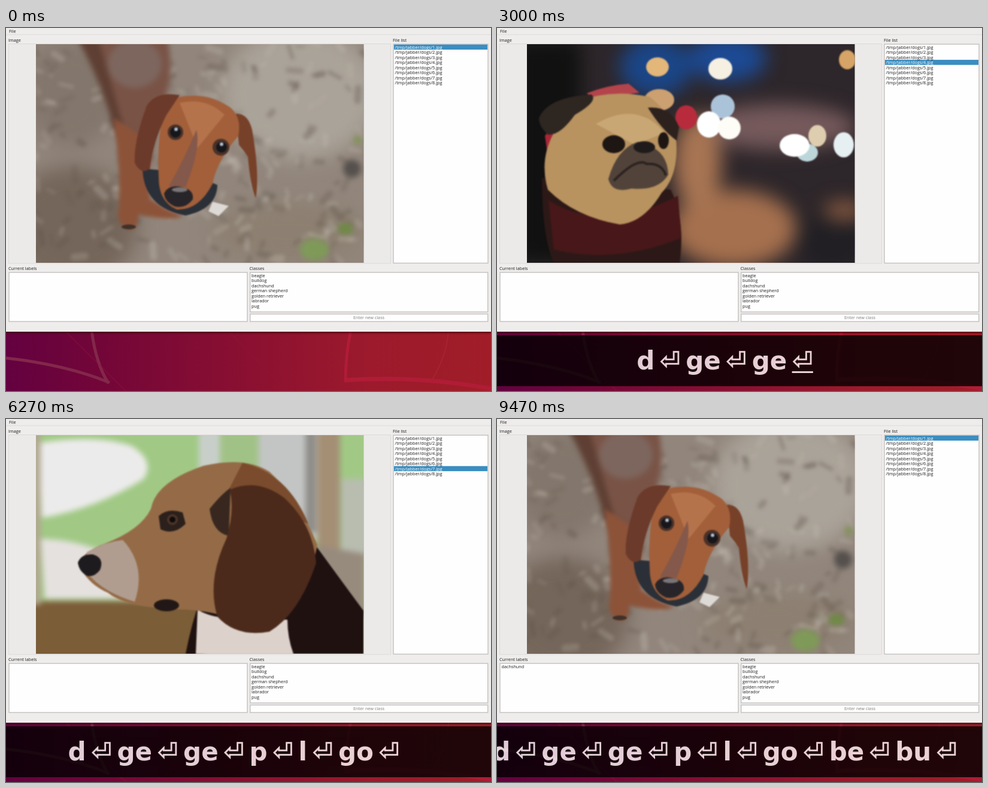
Animation, 810 px wide and 606 px high, one loop 9.54 s. Source, as an HTML page:

```html
<!DOCTYPE html>
<html lang="en">
<head>
<meta charset="utf-8">
<title>Image labelling</title>
<style>
html, body { margin: 0; width: 100%; height: 100%; overflow: hidden; background: #efedec; }
svg { position: absolute; left: 0; top: 0; }
#ui text { font: 7.27px "Open Sans", "Noto Sans", sans-serif; fill: #1e1e1e; white-space: pre; }
#ui .hint { fill: #7d7d7d; text-anchor: middle; }
#ui .on { fill: #fff; }
.box { fill: #fefefe; stroke: #c3c1bf; stroke-width: 1.4; }
.s { filter: blur(1.2px); }
.k { filter: blur(3px); }
.m { filter: blur(5px); }
.l { filter: blur(16px); }
#pics > g { display: none; }
#overlay { position: absolute; left: 0; top: 513px; width: 810px; height: 85px; background: #000; opacity: .8; overflow: hidden; }
#keys { display: flex; justify-content: center; width: 761px; color: #fff; white-space: pre;
  font: bold 42px/85px "DejaVu Sans", sans-serif; }
#keys p { margin: 0; flex: none; }
#keys .held { text-decoration: underline 3px; text-underline-offset: 3px; text-decoration-skip-ink: none; }
</style>
</head>
<body>
<svg width="810" height="606" viewBox="0 0 810 606">
  <defs>
    <linearGradient id="wall">
      <stop offset="0" stop-color="#640140"/><stop offset=".2" stop-color="#730638"/>
      <stop offset=".5" stop-color="#8b1031"/><stop offset=".75" stop-color="#9c1a2c"/><stop offset="1" stop-color="#a01d28"/>
    </linearGradient>
    <linearGradient id="shade" x2="0" y2="1">
      <stop offset="0" stop-color="#200" stop-opacity=".55"/><stop offset="1" stop-color="#200" stop-opacity="0"/>
    </linearGradient>
    <clipPath id="desk"><path d="M0 507H810V606H0Z"/></clipPath>
    <clipPath id="wide"><path d="M50 27H597.5V392H50Z"/></clipPath>
    <clipPath id="full"><path d="M5 31H641.5V388H5Z"/></clipPath>
  </defs>

  <g clip-path="url(#desk)" fill="none">
    <rect y="507" width="810" height="99" fill="url(#wall)"/>
    <path d="M0 551Q100 562 173 592" stroke="#82284a" stroke-width="5"/>
    <path d="M143 505Q150 560 171 593" stroke="#82284a" stroke-width="5"/>
    <path d="M576 505Q567 545 567 590" stroke="#b01c36" stroke-width="5"/>
    <path d="M565 588Q690 580 810 602" stroke="#b01c36" stroke-width="7"/>
    <path d="M739 507Q735 550 712 586" stroke="#a82232" stroke-width="2"/>
    <path d="M372 507L470 606M100 507L200 606" stroke="#92143a" stroke-opacity=".35" stroke-width="2"/>
    <rect y="507" width="810" height="5" fill="url(#shade)"/>
  </g>

  <g id="ui">
    <path d="M0 11H810" stroke="#dddbd9"/>
    <rect x="4.5" y="26.5" width="638" height="366.5" fill="#ebeae9" stroke="#dcdad8"/>
    <rect class="box" x="647" y="27" width="158" height="365.5"/>
    <rect class="box" x="5" y="408" width="398" height="82"/>
    <rect class="box" x="407.7" y="408" width="397" height="66"/>
    <rect class="box" x="407.7" y="477.5" width="397" height="12.5"/>
    <text x="5" y="8">File</text>
    <text x="4" y="22.8">Image</text>
    <text x="646" y="22.8">File list</text>
    <text x="4" y="404">Current labels</text>
    <text x="406.5" y="404">Classes</text>
    <text x="606" y="486" class="hint">Enter new class</text>
    <text x="7.5" y="415.5" id="label"></text>
    <rect id="row" x="648" width="156" height="8.5" fill="#3a8dc0"/>
  </g>

  <g id="pics">
    <g clip-path="url(#wide)">
      <rect x="50" y="27" width="548" height="365" fill="#92867c"/>
      <g class="l">
        <ellipse cx="110" cy="330" rx="110" ry="100" fill="#75665b"/>
        <ellipse cx="110" cy="110" rx="80" ry="90" fill="#83766c"/>
        <ellipse cx="490" cy="110" rx="130" ry="110" fill="#aaa399"/>
        <ellipse cx="470" cy="340" rx="130" ry="50" fill="#8d8072"/>
      </g>
      <g id="litter" class="k" fill="none" stroke-linecap="round"></g>
      <g class="m">
        <path d="M125 20H270Q285 90 255 140L240 230L185 180Q165 100 125 20Z" fill="#795346"/>
        <ellipse cx="215" cy="60" rx="45" ry="40" fill="#7d665e"/>
        <path d="M120 20H155L195 160L180 170Q160 90 120 20Z" fill="#5f3f33"/>
        <ellipse cx="578" cy="235" rx="15" ry="15" fill="#55504d"/>
        <ellipse cx="515" cy="370" rx="24" ry="18" fill="#7f9a58"/>
        <ellipse cx="567" cy="335" rx="13" ry="9" fill="#6d8a42"/>
        <ellipse cx="587" cy="187" rx="6" ry="7" fill="#7d9350"/>
      </g>
      <path class="k" d="M180 150L240 190L240 285Q270 305 296 314Q270 324 222 311Q220 336 206 337Q188 330 187 312Q194 260 180 150Z" fill="#8c5339"/>
      <g class="s">
        <ellipse cx="205" cy="332" rx="12" ry="4" fill="#40302a"/>
        <path d="M228 235Q230 300 300 313Q352 302 353 262L300 240Z" fill="#2b2f37"/>
        <path d="M345 290L372 297L355 314L338 306Z" fill="#ddd9d6"/>
        <path d="M384 143Q404 142 411 170Q424 245 417 284Q408 262 404 215Q398 205 389 195Z" fill="#774028"/>
        <path d="M285 116Q335 105 375 133Q394 150 388 180Q352 222 345 260Q322 305 285 303Q255 290 255 250Q252 190 262 145Z" fill="#a25f3a"/>
        <path d="M290 125Q335 115 365 145L320 200Z" fill="#b5734b"/>
        <path d="M318 170Q326 200 300 265L272 264Q300 215 318 170Z" fill="#84584a"/>
        <path d="M290 112Q250 105 235 130Q213 190 215 225Q225 246 240 235Q245 190 268 145Z" fill="#6b3a2a"/>
        <circle cx="283" cy="174" r="13" fill="#4a3128"/><circle cx="359" cy="199" r="14" fill="#4a3128"/>
        <circle cx="283" cy="174" r="9" fill="#16161b"/><circle cx="360" cy="199" r="9" fill="#16161b"/>
        <circle cx="284" cy="169" r="3" fill="#b3c0d2"/><circle cx="360" cy="194" r="3" fill="#b3c0d2"/>
        <path d="M264 276Q272 260 295 266Q314 270 312 286Q300 302 282 298Q265 290 264 276Z" fill="#272529"/>
        <ellipse cx="290" cy="270" rx="13" ry="4" fill="#797477"/>
      </g>
    </g>

    <g clip-path="url(#wide)">
      <rect x="50" y="27" width="548" height="365" fill="#f2ebe9"/>
      <g class="l">
        <ellipse cx="575" cy="120" rx="35" ry="100" fill="#cfbdb2"/>
        <ellipse cx="440" cy="165" rx="170" ry="28" fill="#dac6b8"/>
        <rect x="30" y="20" width="100" height="130" fill="#56642f"/>
      </g>
      <g class="m">
        <path d="M50 27H275Q262 70 300 135Q260 155 222 155L210 185H190L170 155Q100 160 50 130Z" fill="#667340"/>
        <path d="M50 30H100L110 80L50 125ZM80 150Q110 115 170 120L240 75L298 135Q260 150 222 155L210 185H190L180 160Z" fill="#34471f"/>
        <path d="M50 165Q110 190 200 185Q270 195 320 235L420 200Q520 195 598 175V238Q480 262 420 255L300 245L50 230Z" fill="#a0744f"/>
      </g>
      <g class="k">
        <path d="M50 320L155 215Q180 215 265 270L345 285L350 310L50 366Z" fill="#efeae8"/>
        <path d="M220 170Q265 175 300 215L280 225Q255 200 220 185Z" fill="#efe8e5"/>
        <path d="M50 210Q95 205 140 240Q160 275 182 288L125 296Q110 325 50 335Z" fill="#8d5c36"/>
        <path d="M192 232Q225 215 255 245L258 277Q215 280 192 232Z" fill="#99683f"/>
        <path d="M50 358Q140 350 200 328Q290 305 345 300Q420 262 598 246V392H50Z" fill="#8b8a86"/>
        <ellipse cx="300" cy="362" rx="48" ry="26" fill="#b4a99f"/><ellipse cx="560" cy="350" rx="60" ry="40" fill="#b0a59a"/>
        <ellipse cx="535" cy="280" rx="65" ry="10" fill="#c0b5aa"/>
      </g>
      <g class="s">
        <path d="M332 275Q352 315 343 340L357 392H505Q503 340 470 300Q450 255 405 220L365 230Z" fill="#8f653f"/>
        <path d="M405 222Q455 255 475 305Q506 350 505 392H498Q480 330 450 300Z" fill="#5d432c"/>
        <path d="M266 258Q275 244 300 228Q305 190 345 177L375 185Q402 200 400 230Q395 260 350 275Q310 282 275 274Z" fill="#85603e"/>
        <path d="M266 258Q275 244 303 226Q340 232 348 258Q325 282 280 276Z" fill="#302a28"/>
        <path d="M303 215Q315 185 345 178L372 187Q330 205 303 215Z" fill="#493426"/>
        <path d="M319 184Q311 140 321 132Q340 150 345 177Z" fill="#30241f"/>
        <path d="M351 180Q350 125 367 118Q388 145 398 185L397 222Q365 200 351 180Z" fill="#2f2420"/>
        <path d="M360 178Q358 145 368 135Q380 160 388 190Z" fill="#604437"/>
        <ellipse cx="332" cy="214" rx="5" ry="4" fill="#15100e"/>
        <path d="M358 319Q395 306 416 276" fill="none" stroke="#4b2d25" stroke-width="11"/>
        <circle cx="366" cy="339" r="6" fill="none" stroke="#c9a477" stroke-width="2"/>
        <path d="M361 346H371V362L366 369L361 362Z" fill="#bd4038"/>
      </g>
    </g>

    <g clip-path="url(#wide)">
      <rect x="50" y="27" width="548" height="365" fill="#8e9379"/>
      <g class="l"><rect x="30" y="270" width="600" height="150" fill="#777557"/><ellipse cx="470" cy="90" rx="140" ry="60" fill="#b9bbaa"/></g>
      <g class="s">
        <path d="M235 392Q240 280 285 235H365Q415 290 420 392Z" fill="#8d6440"/>
        <path d="M270 205L268 95Q305 110 320 140Q340 110 375 95L374 205Q355 275 322 285Q287 270 270 205Z" fill="#a27448"/>
        <path d="M290 205Q322 180 354 205Q350 280 322 285Q296 280 290 205Z" fill="#2c2522"/>
        <circle cx="298" cy="188" r="6" fill="#1b1513"/><circle cx="347" cy="188" r="6" fill="#1b1513"/>
      </g>
    </g>

    <g clip-path="url(#wide)">
      <rect x="50" y="27" width="548" height="365" fill="#2d262a"/>
      <g class="l">
        <ellipse cx="265" cy="65" rx="60" ry="50" fill="#1a4688"/>
        <ellipse cx="385" cy="50" rx="65" ry="40" fill="#1c4a94"/>
        <ellipse cx="470" cy="165" rx="130" ry="38" fill="#765a5c"/>
        <ellipse cx="395" cy="335" rx="105" ry="65" fill="#a5704e"/>
        <ellipse cx="335" cy="225" rx="40" ry="80" fill="#a87553"/>
        <ellipse cx="560" cy="355" rx="60" ry="50" fill="#211f24"/>
        <ellipse cx="580" cy="305" rx="35" ry="15" fill="#916044"/>
        <rect x="30" y="20" width="110" height="372" fill="#101110"/>
      </g>
      <g class="s">
        <ellipse cx="268" cy="65" rx="19" ry="16" fill="#e3b679"/><ellipse cx="271" cy="120" rx="25" ry="18" fill="#cca071"/>
        <ellipse cx="373" cy="68" rx="20" ry="18" fill="#f6f0e2"/><circle cx="377" cy="131" r="20" fill="#abc3d8"/>
        <ellipse cx="354" cy="161" rx="20" ry="22" fill="#fff"/><circle cx="388" cy="167" r="19" fill="#fdfcf7"/>
        <ellipse cx="316" cy="149" rx="18" ry="20" fill="#b82b3d"/><ellipse cx="518" cy="208" rx="18" ry="15" fill="#bcd6da"/>
        <ellipse cx="497" cy="196" rx="25" ry="19" fill="#fff"/><ellipse cx="535" cy="180" rx="15" ry="18" fill="#dfcdb0"/>
        <ellipse cx="579" cy="195" rx="17" ry="21" fill="#e6f0f3"/><ellipse cx="585" cy="53" rx="14" ry="16" fill="#d6a466"/>
        <path d="M75 250Q75 350 95 392H305Q315 320 290 270Z" fill="#2c1917"/>
        <path d="M86 288Q180 345 302 280L308 350Q200 395 95 370Z" fill="#481719"/>
        <path d="M80 180Q90 165 105 172V215H85Z" fill="#a92738"/>
        <path d="M150 109Q185 95 220 93L238 108L160 118Z" fill="#b4444b"/>
        <path d="M125 125Q190 100 255 115Q300 150 300 200Q300 250 275 275Q245 325 205 328Q130 315 85 270Q70 220 95 175Z" fill="#b8925f"/>
        <path d="M165 160Q235 120 280 175L230 195Z" fill="#c9a775"/>
        <path d="M70 150Q85 115 158 111Q170 122 130 145Q105 180 85 178Q70 165 70 150Z" fill="#2e2621"/>
        <path d="M252 133Q290 130 304 165L300 188Q275 170 252 133Z" fill="#2d211e"/>
        <path d="M186 252Q200 202 235 190Q285 200 286 245Q270 272 225 268Q192 277 186 252Z" fill="#51433a"/>
        <ellipse cx="246" cy="199" rx="18" ry="10" fill="#201b1b"/>
        <path d="M195 255Q235 215 250 227Q275 225 282 246" fill="none" stroke="#2b2220" stroke-width="4"/>
        <ellipse cx="195" cy="194" rx="19" ry="15" fill="#1d1613"/><ellipse cx="278" cy="188" rx="9" ry="14" fill="#1d1613"/>
      </g>
    </g>

    <g clip-path="url(#wide)">
      <rect x="50" y="27" width="548" height="365" fill="#858b70"/>
      <g class="l"><rect x="30" y="290" width="600" height="120" fill="#6b6d47"/><ellipse cx="180" cy="90" rx="140" ry="60" fill="#aeb19c"/></g>
      <g class="s">
        <path d="M230 392Q235 300 280 245H370Q415 300 425 392Z" fill="#cba778"/>
        <path d="M265 125Q322 80 380 125L378 205Q360 270 322 278Q285 270 267 205Z" fill="#d8b88b"/>
        <path d="M270 115Q238 120 242 200Q262 205 274 150ZM374 115Q408 120 402 200Q382 205 370 150Z" fill="#b48b59"/>
        <ellipse cx="322" cy="226" rx="17" ry="12" fill="#292220"/>
        <circle cx="298" cy="175" r="6" fill="#241b17"/><circle cx="347" cy="175" r="6" fill="#241b17"/>
      </g>
    </g>

    <g clip-path="url(#wide)">
      <rect x="49" y="27" width="549" height="365" fill="#1d2a14"/>
      <g class="l">
        <rect x="30" y="10" width="600" height="50" fill="#3b3636"/>
        <ellipse cx="420" cy="115" rx="200" ry="32" fill="#2d4619"/>
        <ellipse cx="120" cy="120" rx="90" ry="28" fill="#33491d"/>
        <ellipse cx="520" cy="210" rx="70" ry="8" fill="#486029"/>
        <ellipse cx="480" cy="320" rx="140" ry="70" fill="#141d10"/>
      </g>
      <g class="m"><rect x="50" y="20" width="60" height="45" fill="#171214"/><ellipse cx="378" cy="40" rx="45" ry="26" fill="#625e6b"/><ellipse cx="341" cy="74" rx="10" ry="16" fill="#977b78"/></g>
      <g class="s">
        <path d="M50 392Q75 360 82 310Q95 265 140 250L255 270L325 320Q347 340 342 392Z" fill="#9b6839"/>
        <path d="M230 300Q300 315 335 328Q352 350 332 392H255Z" fill="#d0a677"/>
        <path d="M130 255Q190 300 210 392H170Q145 320 130 255Z" fill="#704623"/>
        <path d="M190 115Q250 92 335 108Q358 135 356 178Q380 205 405 223Q415 250 385 272Q350 285 320 278Q265 275 238 255Q195 200 190 115Z" fill="#cc975e"/>
        <path d="M232 112Q300 95 345 115Q355 150 350 178Q320 155 235 155Z" fill="#ebcaa2"/>
        <path d="M250 253Q290 285 380 275Q360 300 340 326Q270 310 250 253Z" fill="#281713"/>
        <path d="M328 290L375 278Q402 315 398 335Q380 352 362 340Q340 325 328 290Z" fill="#d4959b"/>
        <path d="M190 112Q235 115 232 170Q248 230 238 270Q218 298 190 265Q140 250 120 228Q132 205 120 184Q150 130 190 112Z" fill="#905629"/>
        <path d="M180 125Q215 130 205 180L135 205Q140 145 180 125Z" fill="#b1753c"/>
        <path d="M365 235Q390 216 408 226Q410 248 390 260Q370 255 365 235Z" fill="#201918"/>
        <ellipse cx="288" cy="184" rx="13" ry="7" fill="#261813"/>
      </g>
    </g>

    <g clip-path="url(#wide)">
      <rect x="50" y="27" width="548" height="365" fill="#a1c985"/>
      <g class="m">
        <path d="M55 40Q150 25 210 45Q250 70 230 100Q150 150 60 165Z" fill="#ecebeb"/>
        <path d="M58 200Q130 200 200 240L320 300H65Z" fill="#e5e1df"/>
        <rect x="40" y="304" width="290" height="100" fill="#7b5d38"/>
        <rect x="42" y="20" width="16" height="290" fill="#b0a78f"/>
        <rect x="322" y="20" width="35" height="90" fill="#c8cfca"/>
        <rect x="357" y="20" width="65" height="65" fill="#a1c287"/>
        <rect x="422" y="20" width="100" height="180" fill="#c3c5c4"/>
        <rect x="500" y="20" width="18" height="170" fill="#8f8d88"/>
        <rect x="520" y="20" width="38" height="220" fill="#a48f75"/>
        <rect x="560" y="100" width="45" height="130" fill="#b8bdb0"/>
        <path d="M515 210L600 225V330H560Z" fill="#978b7e"/>
      </g>
      <g class="s">
        <path d="M300 392Q310 340 325 300L480 160Q560 270 597 320V392Z" fill="#1f1110"/>
        <path d="M320 318Q350 340 470 335Q470 365 480 392H317Z" fill="#ddd2cb"/>
        <path d="M120 240Q135 218 165 208Q225 185 242 150Q250 105 330 78Q400 62 440 88Q490 135 520 210Q500 320 400 340Q340 318 290 318Q200 315 170 290Q135 275 120 240Z" fill="#956b47"/>
        <path d="M395 73Q470 90 505 175L372 118Z" fill="#7a4c2d"/>
        <path d="M135 222Q165 205 195 202Q235 245 215 305Q165 290 140 262Z" fill="#b09d90"/>
        <path d="M340 150Q360 125 375 115L372 195Q345 190 340 150Z" fill="#38271f"/>
        <path d="M374 118Q420 98 465 132Q512 175 518 240Q490 325 440 355Q385 365 353 330Q335 270 368 200Q382 155 374 118Z" fill="#4c2a1b"/>
        <path d="M120 240Q125 225 145 226Q165 232 157 252Q148 264 136 262Q122 255 120 240Z" fill="#1e1b1f"/>
        <path d="M255 162Q270 148 295 156L300 175Q280 195 258 184Z" fill="#2b201c"/><circle cx="278" cy="168" r="9" fill="#4d3427"/><circle cx="278" cy="168" r="5" fill="#0d0b0b"/>
        <ellipse cx="268" cy="311" rx="21" ry="10" fill="#211716"/>
      </g>
    </g>

    <g clip-path="url(#full)">
      <rect x="5" y="31" width="637" height="357" fill="#dad9dc"/>
      <g class="m">
        <path d="M-10 262L270 250H660V400H-10Z" fill="#c8a590"/>
        <ellipse cx="90" cy="340" rx="100" ry="30" fill="#d5b6a4"/>
        <rect x="180" y="95" width="40" height="55" fill="#dac5ba"/>
      </g>
      <g class="s">
        <rect x="466" y="31" width="176" height="195" fill="#c9cbd2"/>
        <rect x="495" y="55" width="105" height="165" fill="#8996a6"/>
        <path d="M545 160H600V220H555Z" fill="#5f7183"/>
        <rect x="413" y="31" width="53" height="227" fill="#dde1e9"/>
        <rect x="221" y="31" width="53" height="44" fill="#111015"/>
        <path d="M5 80L45 78L50 150H5Z" fill="#c3cbd4"/>
        <path d="M5 152H67V255H5Z" fill="#eceef0"/><path d="M5 195H67V207H5Z" fill="#767579"/><path d="M5 250H67V257H5Z" fill="#827a78"/>
        <path d="M85 110L117 108V258L85 262Z" fill="#e8e8ea"/><path d="M65 112H88V200L65 205Z" fill="#29272b"/>
        <path d="M122 215H132L136 258H119Z" fill="#1d1c20"/>
        <path d="M80 108Q92 80 104 108Z" fill="#35343a"/>
        <path d="M405 185H445V232H420Z" fill="#b07848"/>
        <path d="M472 142H560V157H472ZM482 157H496V232H482ZM508 157H525L517 190L528 237H508ZM535 157H552L535 190L565 237H545L520 190ZM482 207H545V219H482Z" fill="#bd8750"/>
        <ellipse cx="511" cy="133" rx="15" ry="7" fill="#798b54"/>
        <path d="M610 220L618 180H634L638 222Z" fill="#25242a"/>
        <ellipse cx="213" cy="291" rx="68" ry="16" fill="#606166"/>
        <path d="M275 295L400 178Q470 235 495 315Q502 360 520 388H295Q275 345 275 295Z" fill="#17171d"/>
        <path d="M278 298Q350 290 368 290Q390 315 420 322Q402 350 410 388H303Q312 360 285 325Z" fill="#e9e4e1"/>
        <path d="M352 95Q355 60 385 50Q410 47 416 95Q426 125 408 150Q390 110 352 95Z" fill="#201e21"/>
        <path d="M368 92Q375 65 395 60Q408 80 404 120Z" fill="#494147"/>
        <path d="M238 106Q240 80 260 80Q275 85 277 98Z" fill="#272326"/>
        <path d="M187 210Q192 175 206 155Q215 105 245 97Q330 80 375 105Q405 140 403 195Q400 250 378 285Q330 300 280 294Q215 290 212 260Q190 240 187 210Z" fill="#1c1b1f"/>
        <path d="M197 207Q225 190 250 210Q315 245 336 258L325 273Q275 260 240 240Q220 262 205 235Z" fill="#403634"/>
        <path d="M245 100Q285 92 310 110L270 137L225 130Z" fill="#343035"/>
        <path d="M222 146Q240 134 265 140Q270 155 245 163Q226 162 222 146Z" fill="#0e0d10"/>
        <path d="M285 150Q325 180 330 225" fill="none" stroke="#0c0b0d" stroke-width="6"/>
        <circle cx="322" cy="131" r="15" fill="#625a59"/><circle cx="322" cy="131" r="11" fill="#111116"/><circle cx="316" cy="126" r="3" fill="#a9b5c4"/>
        <ellipse cx="213" cy="153" rx="7" ry="9" fill="#514a4b"/>
      </g>
    </g>
  </g>
</svg>
<div id="overlay"><div id="keys"><p><span></span><span class="held"></span></p></div></div>

<script>
const LOOP = 9540, ROW = 8.5;
const $ = id => document.getElementById(id);

// Each track holds [start in ms, value].
const pics = [[0, 1], [1730, 2], [2470, 3], [3000, 4], [4200, 5], [5000, 6], [6270, 7], [7000, 8], [8200, 1]];
const labels = [[0, ''], [1270, 'dachshund'], [1730, ''], [2130, 'german shepherd'], [2470, ''],
  [2730, 'german shepherd'], [3000, ''], [3670, 'pug'], [4200, ''], [4730, 'labrador'], [5000, ''],
  [5800, 'golden retriever'], [6270, ''], [6730, 'beagle'], [7000, ''], [7730, 'bulldog'], [8200, 'dachshund']];
const presses = [[1270, 'd'], [1530, '⏎'], [1930, 'g'], [2130, 'e'], [2270, '⏎'], [2600, 'g'], [2730, 'e'],
  [2870, '⏎'], [3670, 'p'], [4000, '⏎'], [4730, 'l'], [4930, '⏎'], [5730, 'g'], [5800, 'o'], [6270, '⏎'],
  [6600, 'b'], [6730, 'e'], [6930, '⏎'], [7670, 'b'], [7730, 'u'], [8000, '⏎']];
const releases = [1470, 3130, 3870, 4200, 5130, 6000, 6270, 7200, 7930, 8200];

const at = (track, t) => track.filter(([start]) => start <= t).pop()[1];

function add(parent, tag, attrs, text = '') {
  const el = document.createElementNS('http://www.w3.org/2000/svg', tag);
  for (const name in attrs) el.setAttribute(name, attrs[name]);
  el.textContent = text;
  return parent.appendChild(el);
}

const files = [1, 2, 3, 4, 5, 6, 7, 8].map((n, i) =>
  add($('ui'), 'text', { x: 649.5, y: 34.5 + i * ROW }, `/tmp/jabber/dogs/${n}.jpg`));
['beagle', 'bulldog', 'dachshund', 'german shepherd', 'golden retriever', 'labrador', 'pug'].forEach((name, i) =>
  add($('ui'), 'text', { x: 410, y: 415.5 + i * ROW }, name));

// Blurred twigs on the ground
let seed = 7;
const rnd = () => (seed = seed * 16807 % 2147483647) / 2147483647;
for (let i = 0; i < 260; i++) {
  const x = 50 + rnd() * 548, y = 27 + rnd() * 365, a = rnd() * 6.28, r = 6 + rnd() * 16;
  add($('litter'), 'path', {
    d: `M${x} ${y}l${r * Math.cos(a)} ${r * Math.sin(a)}`,
    stroke: rnd() < .5 ? '#c6bfb4' : '#5c5047',
    'stroke-width': 4 + rnd() * 8,
    opacity: .15 + rnd() * .2
  });
}

const [typed, held] = document.querySelectorAll('#keys span');
const thin = '\u2009';

function draw(t) {
  const pic = at(pics, t);
  [...$('pics').children].forEach((g, i) => g.style.display = i === pic - 1 ? 'inline' : 'none');
  files.forEach((el, i) => el.classList.toggle('on', i === pic - 1));
  $('row').setAttribute('y', 27.6 + (pic - 1) * ROW);
  $('label').textContent = at(labels, t);

  const down = presses.filter(([start]) => start <= t);
  $('overlay').hidden = !down.length;
  if (!down.length) return;
  const [since, last] = down.pop();
  const before = down.map(([, key]) => key).join('').replace(/⏎/g, thin + '⏎' + thin);
  typed.textContent = before + (last === '⏎' ? thin : '');
  held.textContent = last;
  held.classList.toggle('held', !releases.some(r => r >= since && r <= t));
}

const begin = performance.now();
function frame(now) {
  draw(Math.max(0, now - begin) % LOOP);
  requestAnimationFrame(frame);
}
draw(0);
requestAnimationFrame(frame);
</script>
</body>
</html>
```
